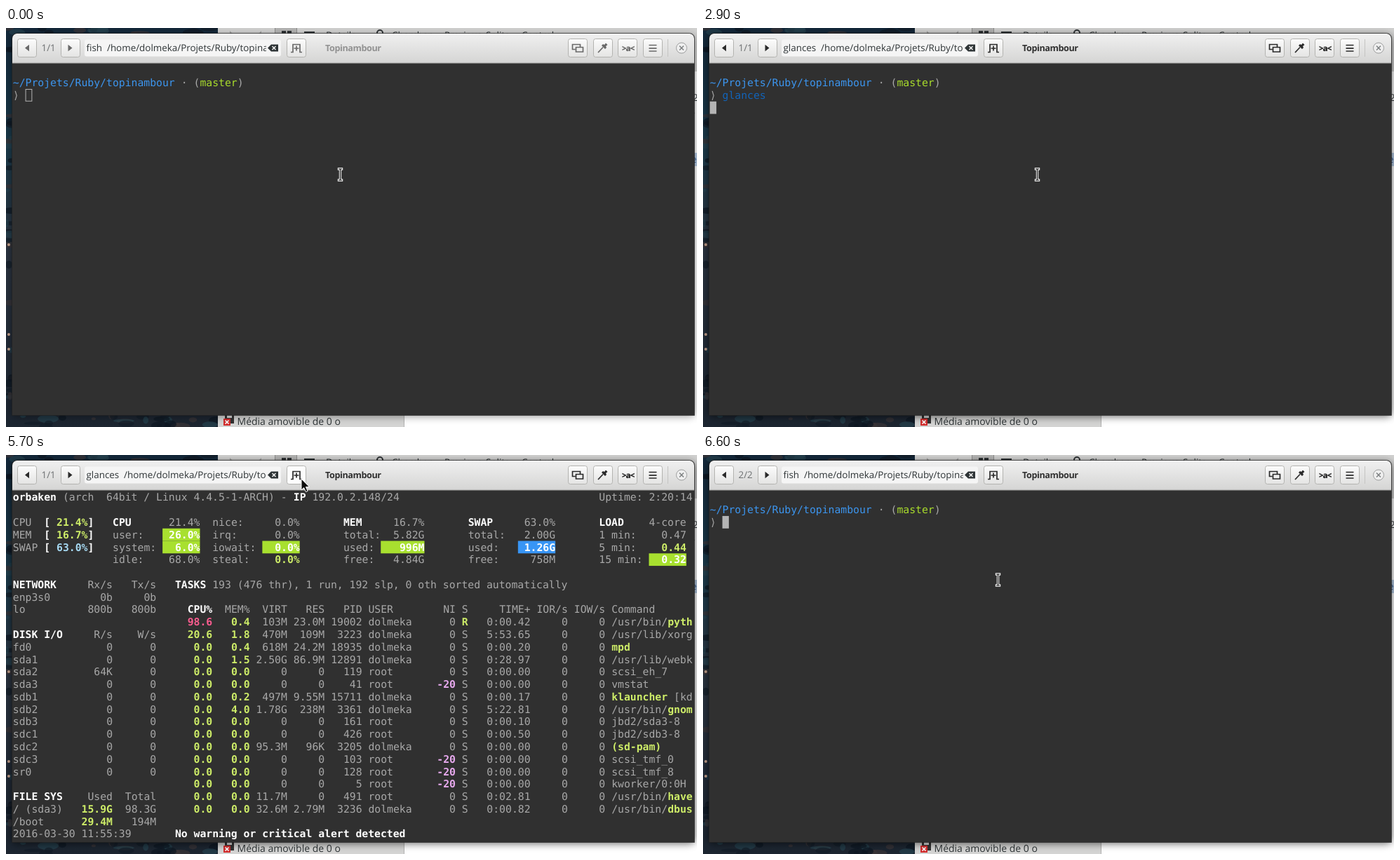
Write an HTML page that moves like this. It is 985 px wide and 569 px high and loops after 8000 ms.

```html
<!DOCTYPE html>
<html lang="fr">
<head>
<meta charset="utf-8">
<title>Terminal</title>
<style>
html, body { margin: 0; width: 100%; height: 100%; overflow: hidden; background: #fff; }
svg { display: block; width: 985px; height: 569px; }
text { white-space: pre; text-rendering: geometricPrecision; }
.term { font: 14.765px "DejaVu Sans Mono", monospace; }
.ui { font: 13.4px "Open Sans", "Noto Sans", sans-serif; }
.n { fill: #a8a8a8; }
.b, .g, .p, .v, .s { font-weight: bold; }
.b { fill: #fff; }
.g { fill: #cdec68; }
.p { fill: #f95c8f; }
.v { fill: #e7a9ee; }
.s { fill: #a6d9f2; }
.path { fill: #3c95ee; }
.lime { fill: #a9dc2c; }
.cmd { fill: #1263b8; }
.hint { fill: #606060; }
.dark { fill: #303030; }
.line { fill: none; stroke: var(--ink); stroke-width: 1.7; }
.fill { fill: var(--ink); }
</style>
</head>
<body>
<svg id="stage" viewBox="0 0 985 569" xmlns="http://www.w3.org/2000/svg">
  <defs>
    <linearGradient id="bar" x2="0" y2="1"><stop stop-color="#f0f0f0"/><stop offset="1" stop-color="#d5d5d4"/></linearGradient>
    <linearGradient id="key" x2="0" y2="1"><stop stop-color="#fcfcfc"/><stop offset="1" stop-color="#e4e4e3"/></linearGradient>
    <linearGradient id="night" x2="0" y2="1">
      <stop stop-color="#14283a"/><stop offset=".3" stop-color="#1b3a4a"/>
      <stop offset=".55" stop-color="#2b3440"/><stop offset="1" stop-color="#1c2530"/>
    </linearGradient>
    <clipPath id="entry"><path d="M113 16h258v26h-258z"/></clipPath>
  </defs>

  <rect width="302" height="569" fill="url(#night)"/>
  <g id="blobs"></g>

  <g class="ui">
    <path d="M302 0h683v569h-683z" fill="#fff"/>
    <path d="M302 0h683v62h-683z" fill="#d2d2d1"/>
    <path d="M383 0h31v9h-31z" fill="#b5b5b4"/>
    <path d="M383.5 0v9M414.5 0v9" stroke="#8d8d8c"/>
    <path d="M302 540h265v29h-265z" fill="#d4d4d3"/>
    <path d="M567.5 540v29" stroke="#b4b4b3"/>
    <path d="M393 4h6v5h-6zM401 4h6v5h-6zM425 5h15v2h-15z" fill="#303436"/>
    <path d="M319 4l5 5h-5zM364 4l-5 5h5z" fill="#a5a5a4"/>
    <circle cx="533" cy="7" r="4" fill="none" stroke="#303436" stroke-width="2"/>
    <g fill="#2e3436">
      <text x="456" y="15">Details</text><text x="550" y="15">Chercher</text>
      <text x="625" y="15">Previous</text><text x="684" y="15">Splits</text><text x="735" y="15">Control</text>
      <text x="329.500" y="566" font-size="14">Média amovible de 0 o</text>
      <text x="979" y="104">2</text><text x="979" y="122">.</text>
    </g>
    <path d="M978 178h8v19h-8z" fill="#b9cfe8"/>
    <text x="977" y="192" fill="#3a5f95">e</text>
    <path d="M312 552h13v12h-13z" fill="#333"/><path d="M315 552h7v4h-7z" fill="#ddd"/>
    <path d="M310 557h10v10h-10z" fill="#d32f2f"/><path d="M312.500 559.500l5 5m0-5l-5 5" stroke="#fff" stroke-width="1.700"/>
  </g>

  <rect id="shade" x="8" y="10" width="974" height="544" rx="7" style="filter:blur(6px)"/>
  <path d="M8.500 552.500V15a7 7 0 0 1 7-7.500h959a7 7 0 0 1 7 7.500v537.500z" fill="#303030" stroke="#1d1d1d" stroke-opacity=".5"/>
  <path d="M9 50V15a7 7 0 0 1 7-7h958a7 7 0 0 1 7 7v35z" fill="url(#bar)"/>
  <path d="M15 8.500h960" stroke="#fafafa"/><path d="M9 50h972" stroke="#a5a5a2"/>

  <g id="head" class="ui">
    <g id="keys"></g>
    <rect x="112" y="16.500" width="280" height="24" rx="3" fill="#f5f5f5"/>
    <path class="fill" d="M33 23.700v9.600l-6-4.800zM88.500 23.700v9.600l6-4.800z"/>
    <text id="page" x="50.500" y="33" fill="#6d7072"></text>
    <text id="job" x="114.500" y="33" fill="#2e3436" clip-path="url(#entry)"></text>
    <path d="M373 28.500l5-5h10v10h-10z" fill="#2e3436"/>
    <path d="M379.500 26l5 5m0-5l-5 5" stroke="#f5f5f5" stroke-width="1.500"/>
    <path class="line" d="M406 34.500h3v-11h10v11h3M414 25.500v7M410.500 29h7"/>
    <text id="name" class="fill" x="455" y="33" font-size="12.600" font-weight="700" letter-spacing="-.4">Topinambour</text>
    <path class="line" d="M811.500 30.500h-4v-7h11v4M812.500 27.500h10v6.500h-10z"/>
    <path class="line" d="M844 35l7-7.500" stroke-width="2"/>
    <path class="fill" d="M849 25l2-2 2 1 2-2.500 2.500 2.500-2.500 2 1 2-2 2z"/>
    <text class="fill" x="878" y="33" font-size="11.500" font-weight="800" letter-spacing="-1">&gt;a&lt;</text>
    <path class="line" d="M916.500 24.500h11M916.500 28.800h11M916.500 33h11"/>
    <path d="M943.500 16v25" stroke="#c4c4c2"/>
    <circle cx="963" cy="28.500" r="7.500" fill="#efefef" stroke="#9c9d9d"/>
    <path d="M960 25.500l6 6m0-6l-6 6" stroke="#7c7f80" stroke-width="1.500"/>
  </g>

  <g class="term">
    <g id="shell"></g>
    <g id="monitor"></g>
  </g>

  <g id="size" class="ui">
    <path d="M930 548v-16l3.500-3.500h43.500v19.500z" fill="#2a6172" stroke="#2f93ad"/>
    <text x="931" y="543" font-size="13.600" fill="#172e36">109x28</text>
  </g>

  <g id="beam" fill="none" stroke-linecap="square">
    <path d="M-2 -8h4M-2 8h4M0 -8v16" stroke="#f4f4f4" stroke-width="3.400"/>
    <path d="M-2 -8h4M-2 8h4M0 -8v16" stroke="#111" stroke-width="1.200"/>
  </g>
  <path id="arrow" d="M0 0v16l3.600-3.400 2.800 6 2.700-1.200-2.700-5.800h5z" fill="#0b0b0b" stroke="#fff"/>
</svg>

<script>
const LOOP = 8000, CW = 8.889, CH = 17.778, LEFT = 9.8, TOP = 51.4;
const USER = 'dolmeka';
const $ = id => document.getElementById(id);

function add(parent, tag, attrs, text) {
  const el = document.createElementNS('http://www.w3.org/2000/svg', tag);
  for (const k in attrs) el.setAttribute(k, attrs[k]);
  if (text !== undefined) el.textContent = text;
  return parent.appendChild(el);
}
const cellX = col => LEFT + col * CW;
const rowY = row => TOP + row * CH;
const cell = (g, row, col, len, fill) => add(g, 'rect',
  { x: cellX(col), y: rowY(row), width: len * CW, height: CH, fill });
const put = (g, row, col, text, cls = 'n') => add(g, 'text',
  { x: cellX(col), y: rowY(row) + 14, class: cls }, text);

// Wallpaper specks
let seed = 7;
const rnd = () => (seed = seed * 16807 % 2147483647) / 2147483647;
const tones = ['#0d1722', '#25424f', '#3b3437', '#121c28'];
for (let i = 0; i < 70; i++) {
  const low = i > 30;
  add($('blobs'), 'ellipse', {
    cx: low ? rnd() * 302 : rnd() * 9, cy: low ? (i % 3 ? 552 + rnd() * 17 : rnd() * 8) : rnd() * 569,
    rx: 3 + rnd() * 12, ry: 2 + rnd() * 4, fill: tones[i % 4], opacity: .7
  });
}
for (const y of [309, 437, 458]) add($('blobs'), 'circle', { cx: 4, cy: y, r: 2, fill: '#c9a58f' });

// Header buttons
const keys = [16, 78, 400, 801, 837, 872, 908].map(x => add($('keys'), 'rect',
  { x: x + .5, y: 15.5, width: 27, height: 26, rx: 3, fill: 'url(#key)', stroke: '#b3b3b0' }));

// System monitor page
function buildMonitor() {
  const g = $('monitor');
  const at = (row, items) => items.forEach(([col, text, cls]) => put(g, row, col, text, cls));
  const right = (row, end, text, cls) => put(g, row, end - text.length, text, cls);
  const mark = (row, end, len, text, fill = '#a8e02f') => {
    cell(g, row, end - len, len, fill);
    right(row, end, text, 'b');
  };

  at(0, [[0, 'orbaken', 'b'], [8, '(arch  64bit / Linux 4.4.5-1-ARCH) -'], [45, 'IP', 'b'],
    [48, '192.0.2.148/24'], [94, 'Uptime: 2:20:14']]);

  [['CPU', '21.4%', 'g'], ['MEM', '16.7%', 'g'], ['SWAP', '63.0%', 's']].forEach(([name, val, cls], i) =>
    at(2 + i, [[0, name], [5, '[', 'b'], [7, val, cls], [12, ']', 'b']]));

  [[16, 'CPU user: system: idle:'], [32, 'nice: irq: iowait: steal:'], [53, 'MEM total: used: free:'],
    [73, 'SWAP total: used: free:'], [94, 'LOAD']].forEach(([col, names]) =>
    names.split(' ').forEach((name, i) => put(g, 2 + i, col, name, /^[A-Z]/.test(name) ? 'b' : 'n')));
  at(3, [[94, '1 min:']]);
  at(4, [[94, '5 min:'], [104, '0.44', 'g']]);
  at(5, [[94, '15 min:'], [42, '0.0%', 'g']]);
  [[30, '21.4% - - 68.0%'], [46, '0.0% 0.0% - -'], [66, '16.7% 5.82G - 4.84G'],
    [87, '63.0% 2.00G - 758M'], [108, '4-core 0.47 - -']].forEach(([end, vals]) =>
    vals.split(' ').forEach((v, i) => v !== '-' && right(2 + i, end, v)));
  mark(3, 30, 6, '26.0%');
  mark(4, 30, 6, '6.0%');
  mark(4, 46, 6, '0.0%');
  mark(4, 66, 7, '996M');
  mark(4, 87, 6, '1.26G', '#3895f5');
  mark(5, 108, 6, '0.32');

  at(7, [[0, 'NETWORK', 'b'], [12, 'Rx/s'], [19, 'Tx/s'], [26, 'TASKS', 'b'],
    [32, '193 (476 thr), 1 run, 192 slp, 0 oth sorted automatically']]);
  at(8, [[0, 'enp3s0'], [14, '0b'], [21, '0b']]);
  at(9, [[0, 'lo'], [12, '800b'], [19, '800b']]);
  at(11, [[0, 'DISK I/O', 'b'], [13, 'R/s'], [20, 'W/s']]);
  'fd0 sda1 sda2 sda3 sdb1 sdb2 sdb3 sdc1 sdc2 sdc3 sr0'.split(' ').forEach((disk, i) => {
    put(g, 12 + i, 0, disk);
    right(12 + i, 16, disk === 'sda2' ? '64K' : '0');
    right(12 + i, 23, '0');
  });
  at(24, [[0, 'FILE SYS', 'b'], [12, 'Used'], [18, 'Total']]);
  at(25, [[0, '/ (sda3)'], [11, '15.9G', 'g'], [18, '98.3G']]);
  at(26, [[0, '/boot'], [11, '29.4M', 'g'], [19, '194M']]);
  at(27, [[0, '2016-03-30 11:55:39'], [26, 'No warning or critical alert detected', 'b']]);

  at(9, [[28, 'CPU%', 'b'], [34, 'MEM%'], [40, 'VIRT'], [47, 'RES'], [53, 'PID'], [57, 'USER'], [69, 'NI'],
    [72, 'S'], [78, 'TIME+'], [84, 'IOR/s'], [90, 'IOW/s'], [96, 'Command']]);
  // cpu mem virt res pid owner nice time command (after * in bold)
  `98.6 0.4 103M 23.0M 19002 u 0 0:00.42 /usr/bin/*pyth
20.6 1.8 470M 109M 3223 u 0 5:53.65 /usr/lib/xorg
0.0 0.4 618M 24.2M 18935 u 0 0:00.20 *mpd
0.0 1.5 2.50G 86.9M 12891 u 0 0:28.97 /usr/lib/webk
0.0 0.0 0 0 119 r 0 0:00.00 scsi_eh_7
0.0 0.0 0 0 41 r -20 0:00.00 vmstat
0.0 0.2 497M 9.55M 15711 u 0 0:00.17 *klauncher* [kd
0.0 4.0 1.78G 238M 3361 u 0 5:22.81 /usr/bin/*gnom
0.0 0.0 0 0 161 r 0 0:00.10 jbd2/sda3-8
0.0 0.0 0 0 426 r 0 0:00.50 jbd2/sdb3-8
0.0 0.0 95.3M 96K 3205 u 0 0:00.00 *(sd-pam)
0.0 0.0 0 0 103 r -20 0:00.00 scsi_tmf_0
0.0 0.0 0 0 128 r -20 0:00.00 scsi_tmf_8
0.0 0.0 0 0 5 r -20 0:00.00 kworker/0:0H
0.0 0.0 11.7M 0 491 r 0 0:02.81 /usr/bin/*have
0.0 0.0 32.6M 2.79M 3236 u 0 0:00.82 /usr/bin/*dbus`.split('\n').forEach((line, i) => {
    const row = 10 + i, [cpu, mem, virt, res, pid, who, nice, time, ...cmd] = line.split(' ');
    right(row, 32, cpu, i ? 'g' : 'p');
    right(row, 38, mem, 'g');
    right(row, 44, virt);
    right(row, 50, res);
    right(row, 56, pid);
    put(g, row, 57, who === 'u' ? USER : 'root');
    right(row, 71, nice, nice === '0' ? 'n' : 'v');
    put(g, row, 72, i ? 'S' : 'R', i ? 'n' : 'g');
    right(row, 83, time);
    right(row, 89, '0');
    right(row, 95, '0');
    let col = 96;
    cmd.join(' ').split('*').forEach((part, k) => {
      put(g, row, col, part, k % 2 ? 'g' : 'n');
      col += part.length;
    });
  });
}
buildMonitor();

// Shell page
const shell = $('shell');
put(shell, 1, 0, '~/Projets/Ruby/topinambour', 'path');
put(shell, 1, 27, '·');
put(shell, 1, 29, '(');
put(shell, 1, 30, 'master', 'lime');
put(shell, 1, 36, ')');
put(shell, 2, 0, '⟩');
const typed = put(shell, 2, 2, '');
const hint = put(shell, 2, 2, '', 'hint');
const caret = cell(shell, 2, 2, 1, '#b4b4b4');
const under = put(shell, 2, 2, '', 'dark');

const TYPING = [
  [0, '', 'n', ''], [1200, 'g', 'n', ''], [1400, 'g', 'p', 'lances'], [1700, 'gla', 'p', 'nces'],
  [2100, 'glanc', 'p', 'es'], [2500, 'glances', 'cmd', ''], [6100, '', 'n', '']
];
// Pointer: time, x, y
const MOVES = [
  [0, 476.5, 209], [3900, 476.5, 207.5], [4600, 476.5, 207.5], [5400, 421, 34],
  [6300, 421, 34], [6600, 420.5, 178]
];
const STEP = 100;
const smooth = p => p * p * (3 - 2 * p);
const mix = (a, b, p) => a + (b - a) * p;

function pointer(t) {
  const q = Math.floor(t / STEP) * STEP;
  const i = MOVES.findLastIndex(m => m[0] <= q);
  const a = MOVES[i], b = MOVES[i + 1];
  if (!b || i === 0) return [a[1], a[2]];
  const p = smooth((q - a[0]) / (b[0] - a[0]));
  return [mix(a[1], b[1], p), mix(a[2], b[2], p)];
}

function show(el, on) { el.style.display = on ? '' : 'none'; }

function drawInput(t, focus) {
  const [, text, cls, rest] = TYPING.findLast(s => s[0] <= t);
  const col = 2 + text.length, running = t >= 2900 && t < 6100;
  typed.textContent = text;
  typed.setAttribute('class', cls);
  hint.textContent = rest.slice(1);
  hint.setAttribute('x', cellX(col + 1));
  under.textContent = rest.slice(0, 1);
  under.setAttribute('x', cellX(col));
  const inset = focus ? 0 : .5;
  const box = {
    x: cellX(running ? 0 : col) + inset, y: rowY(running ? 3 : 2) + inset,
    width: CW + .4 - inset, height: CH - 2 * inset,
    fill: !focus ? 'none' : rest ? '#686868' : '#b4b4b4', stroke: focus ? 'none' : '#b4b4b4'
  };
  for (const k in box) caret.setAttribute(k, box[k]);
}

function draw(t) {
  const focus = t < 300 ? 0 : t < 400 ? .5 : 1;
  const grey = (a, b) => { const v = Math.round(mix(a, b, focus)); return `rgb(${v},${v},${v})`; };
  $('head').style.setProperty('--ink', grey(105, 42));
  $('name').style.fill = grey(146, 48);
  $('shade').setAttribute('opacity', mix(.4, .6, focus));

  const busy = t >= 2900 && t < 6100, second = t >= 6100;
  $('page').textContent = second ? '2/2' : '1/1';
  $('job').textContent = (busy ? 'glances' : 'fish') + `  /home/${USER}/Projets/Ruby/topinambour`;
  keys[2].setAttribute('fill', t >= 5700 && t < 6400 ? '#fdfdfd' : 'url(#key)');

  const full = t >= 3400 && t < 6100;
  show($('monitor'), full);
  show(shell, !full);
  drawInput(t, focus);
  show($('size'), (t >= 400 && t < 1200) || (t >= 6100 && t < 6600));

  const [x, y] = pointer(t), over = y < 50;
  show($('arrow'), over);
  show($('beam'), !over);
  $(over ? 'arrow' : 'beam').setAttribute('transform', `translate(${x} ${y})`);
}

const start = performance.now();
function tick() {
  draw((performance.now() - start) % LOOP);
  requestAnimationFrame(tick);
}
tick();
</script>
</body>
</html>
```
